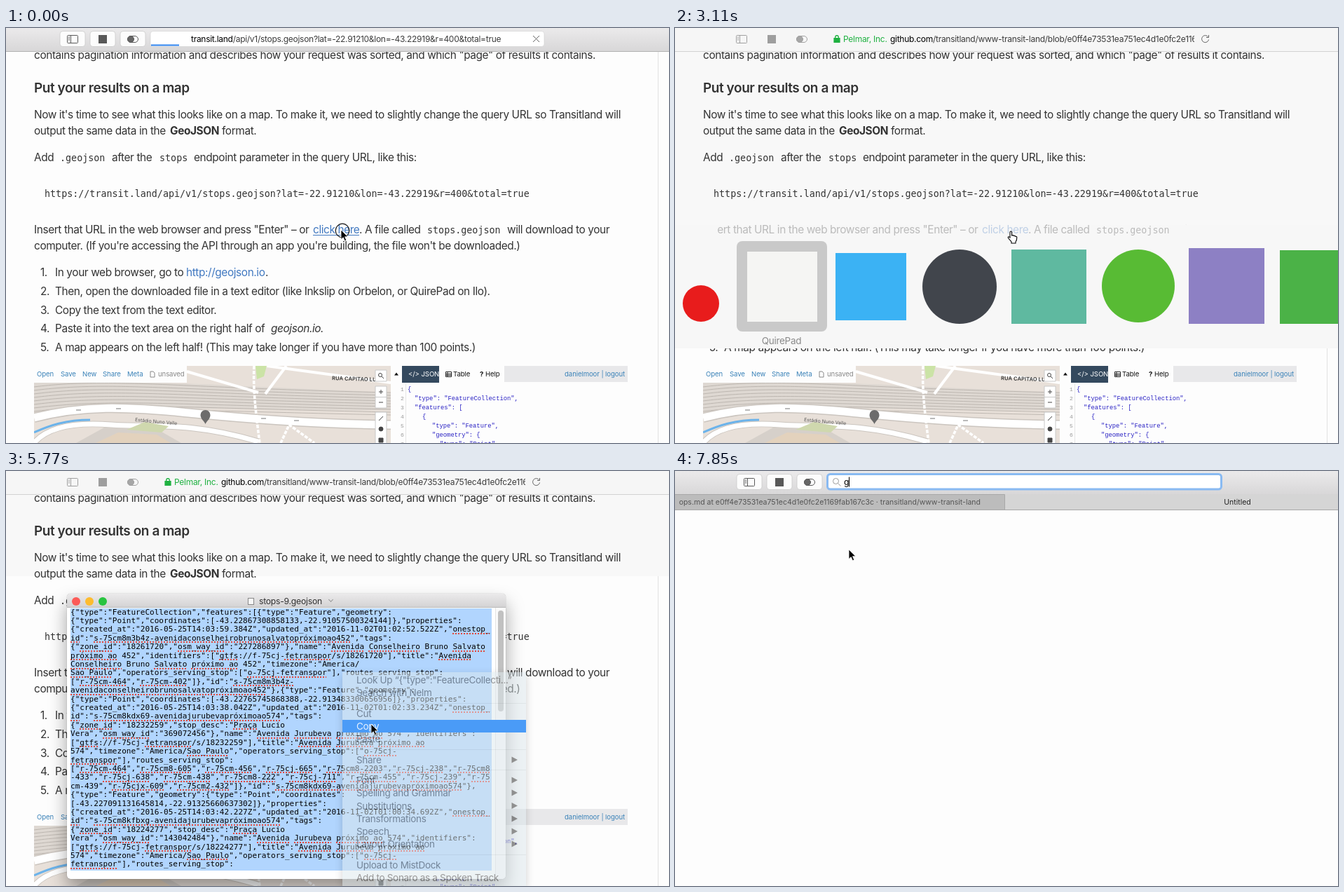
These frames come from a looping animation (946 by 592 pixels, 8 s). An HTML page:

```html
<!DOCTYPE html>
<html lang="en">
<head>
<meta charset="utf-8">
<title>Put your results on a map</title>
<style>
html, body { margin: 0; width: 100%; height: 100%; overflow: hidden; background: #fdfdfd; }
svg, #editor { position: absolute; left: 0; top: 0; }
svg { width: 946px; height: 592px; }
text { white-space: pre; }
svg { font: 15.4px Inter, "Open Sans", sans-serif; letter-spacing: -.4px; fill: #333; }
h1, .head { font-size: 19px; font-weight: 600; letter-spacing: -.44px; }
.code { font: 13.37px "DejaVu Sans Mono", monospace; letter-spacing: 0; }
.link { fill: #4078c0; }
.url { font-size: 12px; letter-spacing: -.28px; fill: #3c3c3c; }
.url .host { fill: #000; }
.tiny { font-size: 9.6px; letter-spacing: -.1px; }
.json { font: 8.8px "Liberation Mono", monospace; letter-spacing: 0; fill: #2a22c4; }
.num { fill: #999; font-size: 8px; }
.tab { font-size: 10.5px; letter-spacing: 0; }
.item { font-size: 13.5px; letter-spacing: -.3px; }

/* every change is a hard cut on one 8 s clock */
.cut { animation: 8s step-end -30ms infinite; }
#firstUrl { animation-name: firstUrl; }
#siteUrl { animation-name: siteUrl; }
#patch { animation-name: patch; }
#activeBar { animation-name: activeBar; }
#idleBar { animation-name: idleBar; }
#tintTop { animation-name: idleBar; }
#tintLow { animation-name: tintLow; }
#underline { animation-name: underline; }
#switcher { animation-name: switcher; }
#pick { animation-name: pick; }
#pickName { animation-name: pickName; }
#veil { animation-name: veil; }
#editor { animation-name: editor; }
#menu { animation-name: menu; }
#mark { animation-name: mark; }
#markCopy { animation-name: markCopy; }
#newTab { animation-name: newTab; }
#hint { animation-name: hint; }
#typed { animation-name: typed; }
#arrow { animation-name: arrow; }
#hand { animation-name: hand; }
#ring { animation-name: ring; }
@keyframes firstUrl { 0% { opacity: 1 } 3.625% { opacity: 0 } }
@keyframes siteUrl { 0% { opacity: 0 } 3.625% { opacity: 1 } }
@keyframes patch { 0% { opacity: 0 } 7.375% { opacity: 1 } 38.875% { opacity: 0 } }
@keyframes activeBar { 0% { opacity: 1 } 38.875% { opacity: 0 } 85.125% { opacity: 1 } }
@keyframes idleBar { 0% { opacity: 0 } 38.875% { opacity: 1 } 85.125% { opacity: 0 } }
@keyframes tintLow { 0% { opacity: 0 } 38.875% { opacity: 1 } 40.69% { opacity: 0 } }
@keyframes underline { 0% { opacity: 1 } 38.875% { opacity: 0 } }
@keyframes switcher { 0% { opacity: 0 } 29.625% { opacity: 1 } 40.69% { opacity: 0 } }
@keyframes pick { 0% { transform: translateX(-128px) } 35.25% { transform: none } }
@keyframes pickName { 0% { opacity: 0 } 35.25% { opacity: 1 } }
@keyframes veil { 0% { opacity: 1 } 38.875% { opacity: .7 } }
@keyframes editor { 0% { opacity: 0 } 40.69% { opacity: 1 } 85.125% { opacity: 0 } }
@keyframes menu { 0% { opacity: 0 } 55.625% { opacity: 1 } 72.125% { opacity: .5 } 74% { opacity: 0 } }
@keyframes mark {
  0% { opacity: 0; transform: none }
  61.125% { opacity: 1; transform: translateY(-48px) }
  63% { opacity: 1; transform: translateY(-18px) }
  66.625% { opacity: 1; transform: none }
  70.31% { opacity: 0; transform: none }
  72.125% { opacity: 1; transform: none }
  74% { opacity: 0; transform: none }
}
@keyframes markCopy { 0% { opacity: 0 } 66.625% { opacity: 1 } 70.31% { opacity: 0 } 72.125% { opacity: 1 } 74% { opacity: 0 } }
@keyframes newTab { 0% { opacity: 0 } 92.5% { opacity: 1 } }
@keyframes hint { 0% { opacity: 1 } 98.125% { opacity: 0 } }
@keyframes typed { 0% { opacity: 0 } 98.125% { opacity: 1 } }
@keyframes arrow {
  0% { opacity: 1; transform: translate(478px, 288px) }
  27.875% { opacity: 0; transform: translate(478px, 288px) }
  42.5% { opacity: 1; transform: translate(478px, 288px) }
  61.125% { opacity: 1; transform: translate(497px, 317px) }
  63% { opacity: 1; transform: translate(518px, 351px) }
  66.625% { opacity: 1; transform: translate(521px, 361px) }
  74% { opacity: 1; transform: translate(517px, 355px) }
  77.75% { opacity: 1; transform: translate(330px, 190px) }
  79.625% { opacity: 1; transform: translate(248px, 112px) }
}
@keyframes hand { 0% { opacity: 0 } 27.875% { opacity: 1 } 42.5% { opacity: 0 } }
@keyframes ring {
  0% { opacity: 1; transform: translate(480px, 289px) }
  1.75% { opacity: 0; transform: translate(480px, 289px) }
  55.625% { opacity: 1; transform: translate(480px, 289px) }
  57.375% { opacity: 0; transform: translate(480px, 289px) }
  68.5% { opacity: 1; transform: translate(522px, 362px) }
  70.31% { opacity: 0; transform: translate(522px, 362px) }
  85.125% { opacity: 1; transform: translate(249px, 112px) }
  87% { opacity: 0; transform: translate(249px, 112px) }
}

#editor { left: 87px; top: 175px; width: 626px; height: 407px; border-radius: 5px; background: #fff;
  box-shadow: 0 0 1px rgba(0,0,0,.5), 0 14px 26px rgba(0,0,0,.36); overflow: clip; overflow-clip-margin: 60px; }
#bar { height: 19px; border-bottom: 1px solid #b9b9b9; border-radius: 5px 5px 0 0; background: linear-gradient(#ebeaeb, #d4d3d4); }
#bar i { position: absolute; top: 4.5px; width: 12px; height: 12px; border-radius: 50%; }
#bar b { position: absolute; left: 274px; top: 2px; font: 12.2px/17px Inter, sans-serif; letter-spacing: -.25px; color: #333; }
#bar s { position: absolute; left: 258px; top: 6px; width: 7px; height: 8px; border: 1px solid #888; background: #f8f8f8; }
#bar em { position: absolute; left: 374px; top: 6px; width: 4px; height: 4px; border: solid #999; border-width: 0 1px 1px 0; transform: rotate(45deg); }
#sel { position: absolute; left: 5px; top: 21px; width: 601px; height: 374px; background: #b1d5fe; }
#gutter { position: absolute; right: 0; top: 20px; width: 14px; bottom: 0; border-left: 1px solid #e4e4e4; background: #fafafa; border-radius: 0 0 5px; }
#gutter i { position: absolute; left: 3px; top: 4px; width: 8px; height: 144px; border-radius: 4px; background: #c1c1c1; }
pre { position: absolute; left: 5px; top: 20.6px; margin: 0; font: 11.06px/12.41px "DejaVu Sans Mono", monospace; color: #000; }
u { text-decoration: underline dotted #e2463c 1.6px; text-underline-offset: 1.5px; text-decoration-skip-ink: none; }
</style>
</head>
<body>
<svg viewBox="0 0 946 592">
  <defs>
    <linearGradient id="chrome" x2="0" y2="1"><stop stop-color="#ebeaeb"/><stop offset="1" stop-color="#d8d7d8"/></linearGradient>
    <linearGradient id="fade"><stop stop-color="#fff" stop-opacity="0"/><stop offset="1" stop-color="#fff"/></linearGradient>
    <clipPath id="mapBox"><path d="M40 482h509v110H40z"/></clipPath>
    <clipPath id="urlBox"><path d="M206 0h535v33H206z"/></clipPath>
    <g id="icons" fill="none" stroke="#5a5a5a">
      <rect x="87.500" y="10.500" width="15" height="11" rx="1"/><path d="M92.500 10.500v11M89 13h2m-2 2h2m-2 2h2"/>
      <rect x="132" y="10" width="12" height="12" fill="#585858" stroke="none"/>
      <rect x="173.500" y="11.500" width="15" height="9" rx="4.500"/><circle cx="178" cy="16" r="4.500" fill="#666"/>
    </g>
    <g id="keys">
      <g fill="#fcfcfc" stroke="#c6c6c6" stroke-width=".7">
        <rect x="77" y="4.500" width="36" height="22" rx="4"/><rect x="120" y="4.500" width="36" height="22" rx="4"/><rect x="163" y="4.500" width="36" height="22" rx="4"/>
      </g>
      <use href="#icons"/>
    </g>
    <g id="site">
      <path d="M227 14.500h8v6h-8zM228.700 15v-2a2.300 2.300 0 0 1 4.600 0v2" fill="#1fb141" stroke="#1fb141" stroke-width="1.200" fill-rule="evenodd"/>
      <path d="M229.400 14v-1a1.600 1.600 0 0 1 3.200 0v1z" fill="#fff"/>
      <g clip-path="url(#urlBox)" class="url">
        <text x="240" y="20" style="fill:#1fb141">Pelmar, Inc.</text>
        <text x="307" y="20"><tspan class="host">github.com</tspan>/transitland/www-transit-land/blob/e0ff4e73531ea751ec4d1e0fc2e1169fab167c3c</text>
      </g>
      <path d="M760.500 12.500a5 5 0 1 0 1 4M761.500 10v3.500h-3.500" fill="none" stroke="#666"/>
    </g>
  </defs>

  <rect width="946" height="592" fill="#fdfdfd"/>
  <path d="M930.500 34v558" stroke="#e2e2e2"/>
  <rect id="tintTop" class="cut" y="34" width="946" height="116" fill="#f8f8f8"/>
  <rect id="tintLow" class="cut" y="150" width="946" height="307" fill="#f8f8f8"/>
  <g id="patch" class="cut" fill="#f5f5f5"><path d="M206 211h374v50H206z"/><rect x="214" y="175" width="50" height="20" rx="3"/></g>

  <text x="40" y="44">contains pagination information and describes how your request was sorted, and which "page" of results it contains.</text>
  <text x="40" y="92" class="head">Put your results on a map</text>
  <text x="40" y="129">Now it's time to see what this looks like on a map. To make it, we need to slightly change the query URL so Transitland will</text>
  <text x="40" y="152">output the same data in the</text>
  <text x="234" y="152" font-weight="700">GeoJSON</text>
  <text x="308" y="152">format.</text>
  <text x="40" y="190">Add</text>
  <text x="77" y="190" class="code">.geojson</text>
  <text x="151" y="190">after the</text>
  <text x="219" y="190" class="code">stops</text>
  <text x="268" y="190">endpoint parameter in the query URL, like this:</text>
  <text x="55" y="241" class="code">https://transit.land/api/v1/stops.geojson?lat=-22.91210&amp;lon=-43.22919&amp;r=400&amp;total=true</text>
  <text x="40" y="293">Insert that URL in the web browser and press "Enter" – or</text>
  <text x="438" y="293" class="link">click here</text>
  <path id="underline" class="cut" d="M438 295.500h66" stroke="#4078c0"/>
  <text x="504" y="293">. A file called</text>
  <text x="601" y="293" class="code">stops.geojson</text>
  <text x="715" y="293">will download to your</text>
  <text x="40" y="316">computer. (If you're accessing the API through an app you're building, the file won't be downloaded.)</text>
  <text x="49" y="354">1.</text><text x="70" y="354">In your web browser, go to</text>
  <text x="257" y="354" class="link">http://geojson.io</text><text x="370" y="354">.</text>
  <text x="49" y="381">2.</text><text x="70" y="381">Then, open the downloaded file in a text editor (like Inkslip on Orbelon, or QuirePad on Ilo).</text>
  <text x="49" y="408">3.</text><text x="70" y="408">Copy the text from the text editor.</text>
  <text x="49" y="434">4.</text><text x="70" y="434">Paste it into the text area on the right half of</text>
  <text x="378" y="434" font-style="italic">geojson.io.</text>
  <text x="49" y="461">5.</text><text x="70" y="461">A map appears on the left half! (This may take longer if you have more than 100 points.)</text>

  <g clip-path="url(#mapBox)" fill="none">
    <path d="M40 482h509v110H40z" fill="#e8e0d9"/>
    <path d="M40 506C160 500 260 508 549 520V545C380 548 200 535 40 552z" fill="#ded8d2"/>
    <g id="rails" stroke="#b4aea8" stroke-width=".8"/>
    <path d="M356 482h16l-4 15-10 4z" fill="#cbe3a6"/>
    <path d="M258 490 360 520M372 482 549 506M400 482l-30 40" stroke="#fff" stroke-width="4"/>
    <g stroke="#cbc5bf" stroke-width="14"><path d="M40 556C110 538 170 540 260 549S440 565 549 566"/><path d="M40 592C60 568 100 562 150 566S260 560 360 590" stroke-width="9"/></g>
    <g stroke="#fff" stroke-width="11"><path d="M40 556C110 538 170 540 260 549S440 565 549 566"/><path d="M40 592C60 568 100 562 150 566S260 560 360 590" stroke-width="7"/></g>
    <path d="M100 592 140 570 215 572 250 592z" fill="#d6d0ca"/>
    <path d="M172 573 198 562 232 568 222 577z" fill="#cfd8ae"/>
    <path d="M128 592 160 577 215 580 235 592z" fill="#e3d2bd"/>
    <path d="M40 577C62 567 85 559 120 559" stroke="#6cb3ea" stroke-width="3"/>
    <path d="M354 482C352 520 358 560 362 592M392 592 404 566 440 592" stroke="#fff" stroke-width="3.500" stroke-dasharray="5 2"/>
    <path d="M100 545h7m50-2h7m200 14h7m40 3h7" stroke="#777"/>
    <text x="465" y="502" class="tiny" style="font-size:7.500px;font-weight:600;letter-spacing:.1px" fill="#333" transform="rotate(2 465 502)">RUA CAPITAO LU</text>
    <text x="184" y="561" style="font-size:6.800px;letter-spacing:0" fill="#555" transform="rotate(5 184 561)">Estádio Nuno Valle</text>
    <path d="M284.500 565c-2-5-7-7-7-13a7 7 0 0 1 14 0c0 6-5 8-7 13z" fill="#6c6c6c"/>
    <g fill="#fff" stroke="#c9c9c9"><path d="M527 488h16v16h-16zM527 511h16v31h-16zM527 526.500h16M527 548h16v50h-16z"/></g>
    <g stroke="#444"><circle cx="534" cy="495" r="2.500"/><path d="M536 497l3 3M532 519h6m-3-3v6M532 534h6M532 560l6-6"/><circle cx="535" cy="572" r="3" fill="#444"/><path d="M532 585h6v6h-6z" fill="#444"/></g>
  </g>
  <path d="M40 482h218v24H40z" fill="#fdfdfd"/>
  <g class="tiny" fill="#3a82b8">
    <text x="44" y="497">Open</text><text x="78" y="497">Save</text><text x="109" y="497">New</text><text x="138" y="497">Share</text><text x="173" y="497">Meta</text>
    <text x="217" y="497" fill="#888">unsaved</text>
    <path d="M206 490h4l2 2v6h-6z" fill="none" stroke="#888"/>
    <path d="M554 495.500l3-4 3 4z" fill="#111"/>
    <path d="M565 482h53v24h-53z" fill="#34495e"/>
    <text x="574" y="497" fill="#fff">&lt;/&gt; JSON</text>
    <path d="M627.500 490.500h8v7h-8zM627 493.500h8m-8 2h8m-5-5v7" fill="none" stroke="#222"/>
    <text x="638" y="497" fill="#111">Table</text>
    <text x="676" y="497" fill="#111"><tspan font-weight="700">?</tspan> Help</text>
    <path d="M711 482h176v23H711z" fill="#e8e8ea"/>
    <text x="883" y="497" text-anchor="end">danielmoor | logout</text>
  </g>
  <path d="M570.500 508v84" stroke="#e6e6e6"/>
  <g id="snippet" class="json"/>

  <g id="activeBar" class="cut">
    <rect width="946" height="33" fill="url(#chrome)"/><path d="M0 33.500h946" stroke="#b2b2b2"/>
    <use href="#keys"/>
    <rect x="206" y="4.500" width="562" height="22" rx="4" fill="#fff" stroke="#cfcfcf" stroke-width=".6"/>
    <g id="firstUrl" class="cut">
      <text x="264" y="20" class="url"><tspan class="host">transit.land</tspan>/api/v1/stops.geojson?lat=-22.91210&amp;lon=-43.22919&amp;r=400&amp;total=true</text>
      <path d="M752 11l9 9m0-9l-9 9" stroke="#666"/>
      <path d="M207 23.500h40v2h-40z" fill="#2f83ee"/>
    </g>
    <g id="siteUrl" class="cut"><use href="#site"/><path d="M712 8h30v16h-30z" fill="url(#fade)"/></g>
  </g>
  <g id="idleBar" class="cut">
    <rect width="946" height="33" fill="#f6f6f6"/><path d="M0 33.500h946" stroke="#d2d2d2"/>
    <use href="#icons" opacity=".55"/><use href="#site"/>
  </g>

  <g id="switcher" class="cut">
    <path d="M0 281h60v18h650v-18h236v176H0z" fill="#f7f7f7"/>
    <path id="veil" class="cut" d="M60 281h650v18H60z" fill="#f7f7f7"/>
    <rect id="pick" class="cut" x="88" y="304" width="129" height="129" rx="8" fill="#c9c9c9"/>
    <circle cx="37" cy="393" r="26" fill="#e81c1c"/>
    <rect x="103" y="319" width="100" height="100" fill="#f5f5f3"/>
    <rect x="229" y="321" width="101" height="96" fill="#3bb2f4"/>
    <circle cx="406" cy="369" r="53" fill="#41454c"/>
    <rect x="480" y="316" width="107" height="106" fill="#5fb9a0"/>
    <circle cx="661" cy="368" r="52" fill="#58bb34"/>
    <rect x="733" y="314" width="108" height="108" fill="#8d80c4"/>
    <rect x="863" y="317" width="107" height="105" fill="#4bb247"/>
    <text id="pickName" class="cut item" x="152" y="451" text-anchor="middle" fill="#8a8a8a">QuirePad</text>
  </g>
</svg>

<div id="editor" class="cut">
  <div id="bar"><i style="left:7px;background:#fc5b57"></i><i style="left:26px;background:#fdbc2e"></i><i style="left:45px;background:#28c43f"></i><s></s><b>stops-9.geojson</b><em></em></div>
  <div id="sel"></div><div id="gutter"><i></i></div>
  <pre></pre>
</div>

<svg viewBox="0 0 946 592">
  <g id="menu" class="cut">
    <path d="M480 287h262v305H480z" fill="#dce7ec" style="filter:drop-shadow(0 4px 6px rgba(0,0,0,.35))"/>
    <path d="M480 331.500h262m-262 66h262m-262 29h262m-262 121h262" stroke="#c3ced3"/>
    <g id="items" class="item"/>
  </g>
  <rect id="mark" class="cut" x="480" y="355" width="262" height="18" fill="#4a9bf7"/>
  <text id="markCopy" class="cut item" x="500" y="369" fill="#e8f2ff">Copy</text>

  <g id="newTab" class="cut">
    <rect width="946" height="592" fill="#fdfdfd"/>
    <rect width="946" height="33" fill="url(#chrome)"/>
    <use href="#keys" x="11"/>
    <rect x="217.500" y="4.500" width="562" height="21.500" rx="4" fill="#fff" stroke="#89baf2" stroke-width="3"/>
    <g fill="none" stroke="#999"><circle cx="229.500" cy="14.500" r="4"/><path d="M232.500 17.500l4 4"/></g>
    <text id="hint" class="cut url" x="241" y="20" style="fill:#a5a5a5">Search or enter website name</text>
    <g id="typed" class="cut"><text x="241" y="20" class="url" style="fill:#000">g</text><path d="M248.500 8.500v14" stroke="#000"/></g>
    <path d="M0 33h470v22H0z" fill="#bcbcbc"/><path d="M470 33h476v22H470z" fill="#d5d5d5"/>
    <path d="M0 33.500h470.500V55M0 55.500h946" fill="none" stroke="#a8a8a8"/>
    <text class="tab" x="436" y="48" text-anchor="end" fill="#555">ops.md at e0ff4e73531ea751ec4d1e0fc2e1169fab167c3c · transitland/www-transit-land</text>
    <text class="tab" x="802.500" y="48" text-anchor="middle" fill="#222">Untitled</text>
  </g>

  <circle id="ring" class="cut" r="9.800" fill="none" stroke="#111" stroke-width="1.200"/>
  <path id="arrow" class="cut" d="M0 0V13.500L3.200 10.700 5.400 15.800 7.700 14.800 5.500 9.800H9.800z" fill="#000" stroke="#fff" stroke-width=".8"/>
  <path id="hand" class="cut" d="M478 299v-7.500q0-1.500 1.300-1.500t1.300 1.500v4.500q2.200-1 2.700.5 1.800-.6 2.300.8 2.200-.4 2.200 1.700 0 4-1.800 6v2h-6v-2l-4.600-5.500q-.6-2 1-1.600z" fill="#fff" stroke="#000" stroke-width="1.100"/>
</svg>

<script>
const $ = id => document.getElementById(id);

$('rails').innerHTML = Array.from({ length: 9 }, (_, i) =>
  `<path d="M40 ${512 + i * 5}C150 ${498 + i * 5} 250 ${514 + i * 4} 549 ${520 + i * 4}"/>`).join('');

const snippet = [[573, '{'], [583, '"type": "FeatureCollection",'], [583, '"features": ['], [594, '{'],
  [608, '"type": "Feature",'], [608, '"geometry": {'], [619, '"type": "Point",']];
$('snippet').innerHTML = snippet.map(([x, s], i) =>
  `<text class="num" x="563" y="${517.5 + i * 13}">${i + 1}</text><text x="${x}" y="${518 + i * 13}">${s}</text>`).join('');

const items = [[298, 'Look Up “{"type":"FeatureCollecti...”'], [316, 'Search with Nelm'],
  [346, 'Cut'], [364, 'Copy'], [382, 'Paste'], [412, 'Share', 1], [441, 'Font', 1],
  [459, 'Spelling and Grammar', 1], [477.5, 'Substitutions', 1], [496, 'Transformations', 1],
  [514, 'Speech', 1], [532, 'Layout Orientation', 1], [562, 'Upload to MistDock'],
  [580, 'Add to Sonaro as a Spoken Track']];
$('items').innerHTML = items.map(([y, s, sub]) =>
  `<text x="500" y="${y + 5}">${s}</text>` + (sub ? `<path d="M721.500 ${y - 4.5}l8.500 4.500-8.500 4.500z"/>` : '')).join('');

// the two later stops share one record layout
const slug = 'avenidajurubevapróximoao574';
const stamp = (a, b) => `{"created_at":"2016-05-25T14:03:${a}Z","updated_at":"2016-11-02T01:${b}Z","onestop_`;
const stop = (key, zone, way) => `id":"s-75cm8${key}-${slug}","tags":
{"zone_id":"${zone}","stop_desc":"Praça Lucio
Vera","osm_way_id":"${way}"},"name":"Avenida Jurubeva próximo ao 574","identifiers":
["gtfs://f-75cj-fetranspor/s/${zone}"],"title":"Avenida Jurubeva próximo ao
574","timezone":"America/Sao_Paulo","operators_serving_stop":["o-75cj-
fetranspor"],"routes_serving_stop":`;
const data = `{"type":"FeatureCollection","features":[{"type":"Feature","geometry":
{"type":"Point","coordinates":[-43.22867308858133,-22.91057500324144]},"properties":
${stamp('59.384', '02:52.522')}
id":"s-75cm8m3b4z-avenidaconselheirobrunosalvatopróximoao452","tags":
{"zone_id":"18261720","osm_way_id":"227286897"},"name":"Avenida Conselheiro Bruno Salvato
próximo ao 452","identifiers":["gtfs://f-75cj-fetranspor/s/18261720"],"title":"Avenida
Conselheiro Bruno Salvato próximo ao 452","timezone":"America/
Sao_Paulo","operators_serving_stop":["o-75cj-fetranspor"],"routes_serving_stop":
["r-75cm-464","r-75cm-402"]},"id":"s-75cm8m3b4z-
avenidaconselheirobrunosalvatopróximoao452"},{"type":"Feature","geometry":
{"type":"Point","coordinates":[-43.22765745868388,-22.913483300656956]},"properties":
${stamp('38.042', '02:33.234')}
${stop('kdx69', '18232259', '369072456')}
["r-75cm-464","r-75cm8-605","r-75cm-456","r-75cj-665","r-75cm8-2203","r-75cj-238","r-75cm8
-433","r-75cj-638","r-75cm-438","r-75cm8-222","r-75cj-711","r-75cm-455","r-75cj-239","r-75
cm-439","r-75cjx-609","r-75cm2-432"]},"id":"s-75cm8kdx69-${slug}"},
{"type":"Feature","geometry":{"type":"Point","coordinates":
[-43.227091131645814,-22.91325660637302]},"properties":
${stamp('42.227', '00:34.692')}
${stop('kfbxg', '18224277', '143042484')}`;
const misspelt = /onestop_|^id(?=")|\w+_id\b|[sro]-75[\wó-]*|avenida[\wó]+|Avenida|Jurubeva|Praça|Salvato|Conselheiro|próximo ao|gtfs|fetranspor|Sao_Paulo/gm;
document.querySelector('pre').innerHTML = data.replace(misspelt, '<u>$&</u>');
</script>
</body>
</html>
```
